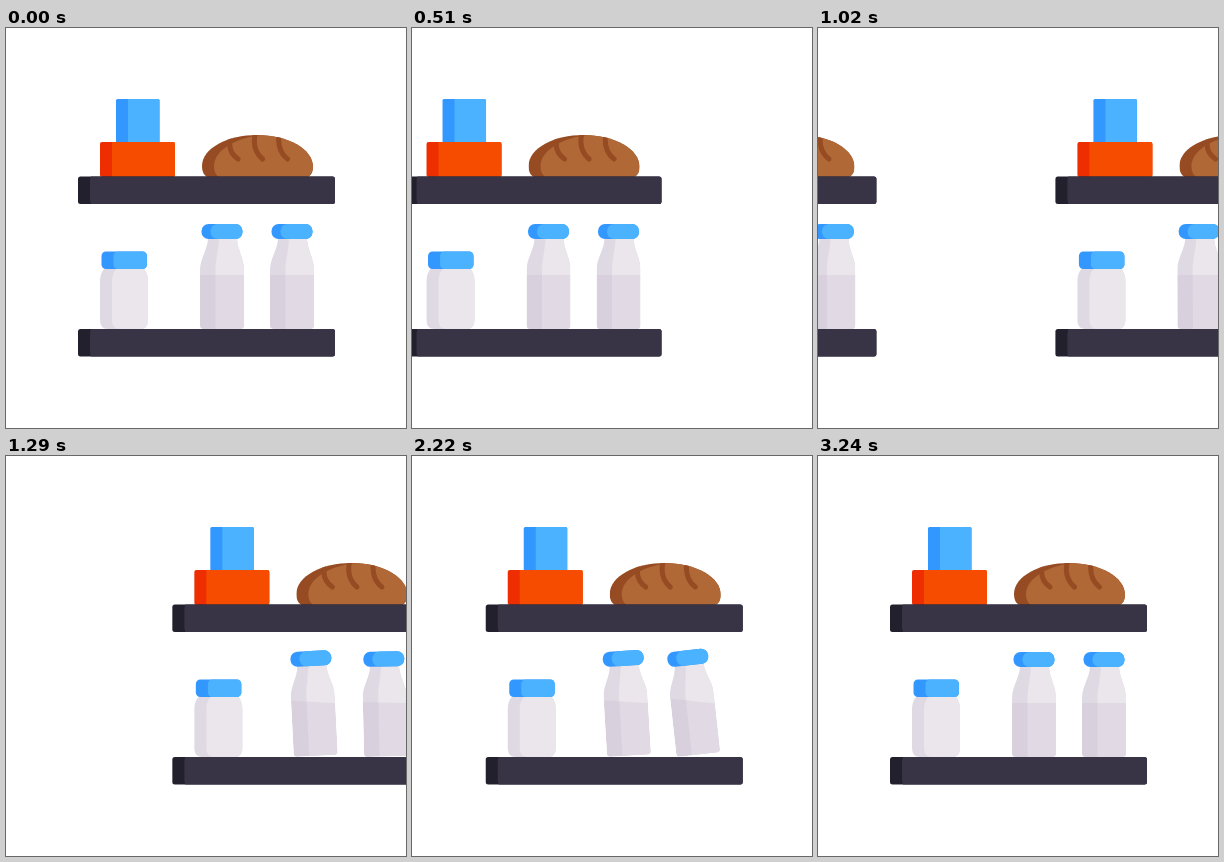
An HTML page for the animation above (5.33 s loop, 400x400 px).

```html
<!DOCTYPE html>
<html lang="en">
<head>
<meta charset="utf-8">
<title>Shelf</title>
<style>
  html, body { margin: 0; width: 100%; height: 100%; overflow: hidden; background: #fff; }
  svg { display: block; width: 100%; height: 100%; }
</style>
</head>
<body>
<svg viewBox="0 0 400 400">
  <defs>
    <clipPath id="glass">
      <path d="M8 -91 H37 C37 -80 44 -71 44 -59 V-4 Q44 0 40 0 H4 Q0 0 0 -4 V-59 C0 -71 8 -80 8 -91Z"/>
    </clipPath>
    <clipPath id="loaf">
      <path d="M201 149 Q196 146 196 138 C196 120 222 107 251 107 C282 107 307 121 307 139 Q307 146 302 149Z"/>
    </clipPath>

    <g id="board">
      <rect x="72" y="148.5" width="257" height="27.5" rx="2.5" fill="#22202d"/>
      <path d="M85 148.5 H326.500 Q329 148.5 329 151 V173.500 Q329 176 326.500 176 H85 Q84 173 84 171 V153 Q84 151 85 148.5Z" fill="#393346"/>
    </g>

    <g id="goods">
      <rect x="110" y="71" width="43.500" height="45" rx="1.500" fill="#3298ff"/>
      <path d="M122 71 H152 Q153.500 71 153.500 72.500 V115 H122Z" fill="#4ab2ff"/>
      <rect x="94" y="114" width="75" height="35" rx="2" fill="#ee2d00"/>
      <path d="M106 114 H167 Q169 114 169 116 V147 Q169 149 167 149 H106Z" fill="#f54c00"/>

      <g clip-path="url(#loaf)">
        <rect x="195" y="106" width="113" height="44" fill="#964b22"/>
        <path d="M213 149 Q208 146 208 138 C208 122 231 109 257 107 L310 104 V150Z" fill="#b06836"/>
        <path d="M224 112 Q222 124 232 131 M249 107 Q246 122 256.500 131 M273 107 Q271 123 281.500 131"
              fill="none" stroke="#964b22" stroke-width="5" stroke-linecap="round"/>
      </g>

      <path d="M99 240 H137 Q142 245 142 253 V292 Q142 301 134 301 H102 Q94 301 94 292 V253 Q94 245 99 240Z" fill="#dfd9e3"/>
      <path d="M111 240 H137 Q142 245 142 253 V292 Q142 301 134 301 H114 Q106 301 106 292 V253 Q106 245 111 240Z" fill="#eae6ec"/>
      <rect x="95.500" y="223.500" width="45.500" height="17.500" rx="4.500" fill="#3298ff"/>
      <rect x="107.500" y="223.500" width="33.500" height="17.500" rx="4.500" fill="#4ab2ff"/>

      <use href="#board"/>
      <use href="#board" y="152.500"/>
    </g>
  </defs>
  <g id="stage"></g>
</svg>
<script>
const LOOP = 5330, SLIDE = 2400, GAP = 436;
const stage = document.getElementById('stage');

const clamp = v => Math.min(1, Math.max(0, v));
const smooth = v => { v = clamp(v); return v * v * (3 - 2 * v); };

// cubic-bezier(x1, 0, x2, 1) solved by bisection
function ease(x, x1, x2) {
  let lo = 0, hi = 1, s = 0.5;
  for (let i = 0; i < 24; i++) {
    s = (lo + hi) / 2;
    const r = 1 - s;
    if (3 * r * r * s * x1 + 3 * r * s * s * x2 + s * s * s < x) lo = s; else hi = s;
  }
  return s * s * (3 - 2 * s);
}

// lean out to the peak, then settle back
const lean = (t, start, peak, end, amp) =>
  -amp * (t < peak ? smooth((t - start) / (peak - start)) : 1 - smooth((t - peak) / (end - peak)));

const bottle = (x, angle) => `
  <g transform="translate(${x} 301) rotate(${angle.toFixed(3)} 0 11)">
    <g clip-path="url(#glass)">
      <rect y="-92" width="44" height="92" fill="#dfd9e3"/>
      <path d="M19 -92 C19 -80 15.500 -71 15.500 -59 V0 H44 V-92Z" fill="#eae6ec"/>
      <rect x="-20" y="-54" width="84" height="90" fill="#c2b2cc" fill-opacity=".25"
            transform="rotate(${(-2 * angle).toFixed(3)} 22 -54)"/>
    </g>
    <rect x="1.500" y="-105" width="41" height="15" rx="7" fill="#3298ff"/>
    <rect x="10.500" y="-105" width="32" height="15" rx="7" fill="#4ab2ff"/>
  </g>`;

const shelf = (x, a, b) => `
  <g transform="translate(${x.toFixed(3)} 0)">
    <use href="#goods"/>${bottle(194, a)}${bottle(264, b)}
  </g>`;

function draw(t) {
  const x = -GAP * ease(clamp(t / SLIDE), 0.333, 0.3);
  const a = lean(t, 960, 1700, 2750, 6.8);
  const b = lean(t, 1040, 1960, 3050, 7.3);
  stage.innerHTML = shelf(x, 0, 0) + shelf(x + GAP, a, b);
}

const begin = performance.now();
function tick() {
  draw((performance.now() - begin) % LOOP);
  requestAnimationFrame(tick);
}
tick();
</script>
</body>
</html>
```
